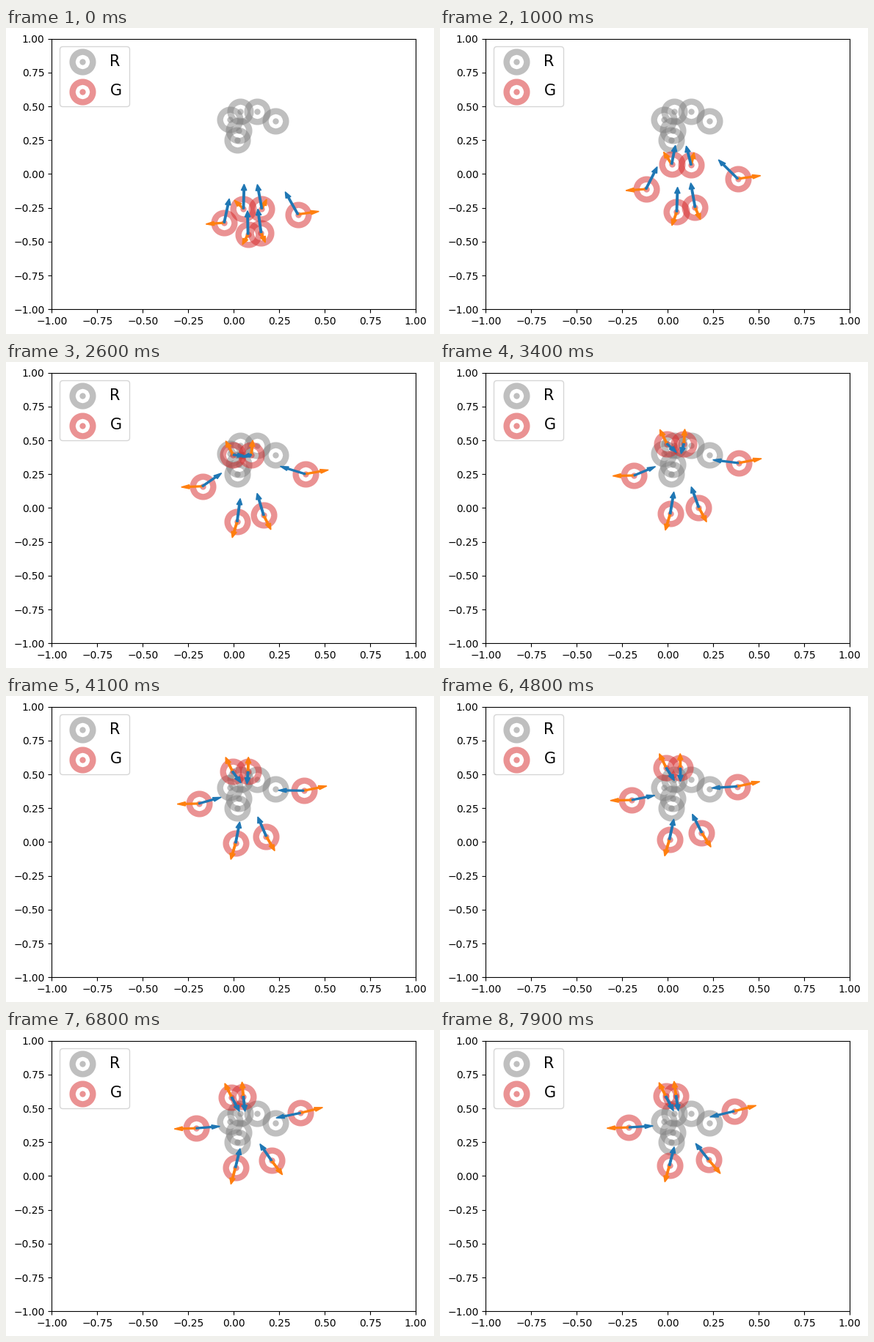
These frames come from a looping animation (583x418 px, 8000 ms). A matplotlib script:

```python
import numpy as np
import matplotlib.pyplot as plt
from matplotlib.animation import FuncAnimation

W, H, DPI = 583, 418, 100
FRAMES, INTERVAL = 80, 100
PULL, DECAY = 0.35, 1.15

real = np.array([(-.020, .405), (.036, .463), (.127, .463),
                 (.228, .395), (.026, .322), (.018, .254)])

# Way points of the generated particles at the given steps
steps = np.array([0, 10, 18, 34, 48, 57, 79])
way = np.array([
    [(-.053, -.360), (.053, -.257), (.154, -.257),
     (.352, -.298), (.078, -.446), (.150, -.433)],
    [(-.120, -.111), (.021, .073), (.128, .067),
     (.384, -.035), (.049, -.279), (.150, -.246)],
    [(-.152, .046), (.003, .265), (.108, .265),
     (.392, .133), (.029, -.178), (.158, -.135)],
    [(-.185, .241), (-.005, .476), (.088, .476),
     (.388, .333), (.013, -.043), (.170, .005)],
    [(-.197, .311), (-.009, .549), (.069, .547),
     (.380, .411), (.009, .019), (.186, .070)],
    [(-.201, .335), (-.011, .568), (.061, .571),
     (.372, .441), (.009, .041), (.194, .095)],
    [(-.213, .360), (-.011, .590), (.045, .595),
     (.364, .479), (.009, .078), (.223, .122)],
])
slope = np.gradient(way, steps, axis=0, edge_order=2)


def positions(n):
    """Cubic Hermite curve through the way points."""
    k = min(np.searchsorted(steps, n, side="right") - 1, len(steps) - 2)
    h = steps[k + 1] - steps[k]
    u = (n - steps[k]) / h
    s = u * u * (3 - 2 * u)
    return (way[k] * (1 - s) + way[k + 1] * s
            + h * u * (1 - u) * ((1 - u) * slope[k] - u * slope[k + 1]))


def pull(points, sources):
    """Mean Gaussian-kernel force drawing points towards sources."""
    d = sources[None] - points[:, None]
    w = np.exp(-DECAY * (d ** 2).sum(axis=2, keepdims=True))
    return PULL * (d * w).mean(axis=1)


fig = plt.figure(figsize=(W / DPI, H / DPI), dpi=DPI)
ax = fig.add_axes([62.3 / W, 33.7 / H, 496 / W, 369.6 / H])
ax.set_xlim(-1, 1)
ax.set_ylim(-1, 1)

# The thick edge is wider than the marker, which leaves a ring and a dot
ax.scatter(*real.T, color="gray", alpha=0.5, lw=20, label="R")
gen = ax.scatter(*way[0].T, color="tab:red", alpha=0.5, lw=20, label="G")
ax.legend(loc="upper left", fontsize=15, borderpad=0.5, labelspacing=1)


def make_arrows(color):
    return [ax.arrow(0, 0, 0.1, 0.1, width=0.01, color=color) for _ in way[0]]


repel = make_arrows("tab:orange")
attract = make_arrows("tab:blue")


def place(arrows, points, forces):
    for arrow, (x, y), (dx, dy) in zip(arrows, points, forces):
        arrow.set_data(x=x, y=y, dx=dx, dy=dy)


def update(n):
    p = positions(n)
    gen.set_offsets(p)
    place(repel, p, -pull(p, p))
    place(attract, p, pull(p, real))
    return [gen, *repel, *attract]


anim = FuncAnimation(fig, update, frames=FRAMES, interval=INTERVAL,
                     repeat=True, repeat_delay=0)
plt.show()
```
